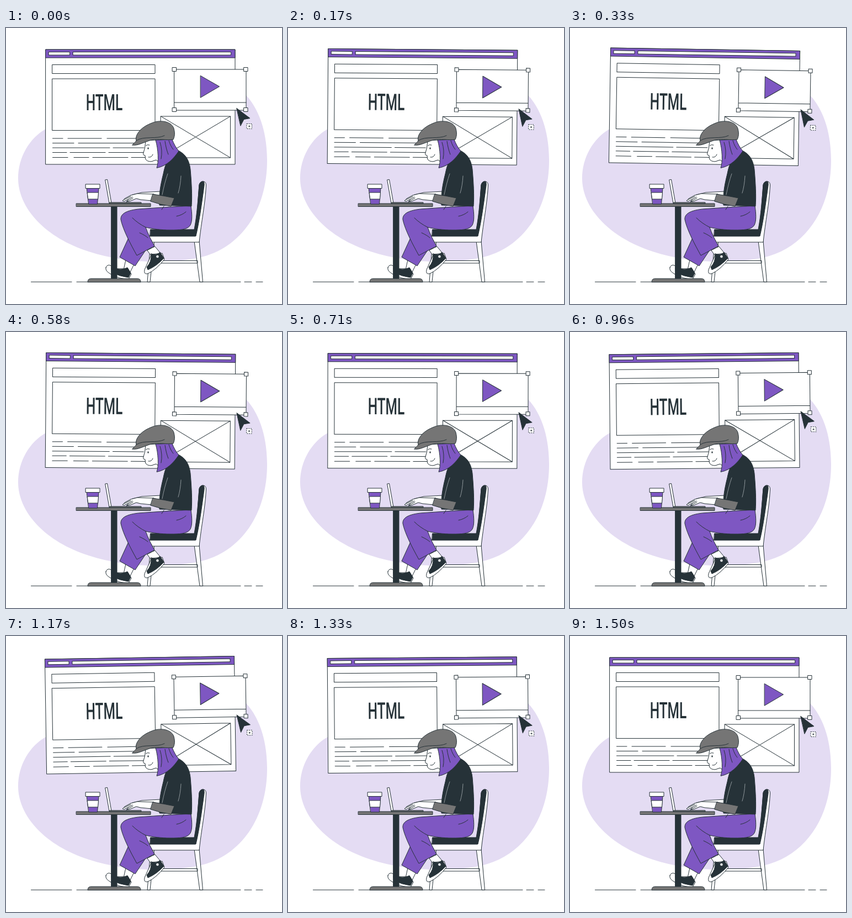
An HTML page that plays this animation: 500 px wide and 500 px high, repeating every 1.54 s.

```html
<!DOCTYPE html>
<html lang="en">
<head>
<meta charset="utf-8">
<title>Web designer at work</title>
<style>
  html, body { margin: 0; width: 100%; height: 100%; overflow: hidden; background: #fff; }
  svg { display: block; width: 100%; height: 100%; }
  .ink { stroke: #263238; stroke-width: 1; stroke-linecap: round; stroke-linejoin: round; }
  .w { fill: #fff; }
  .p { fill: #7e57c2; }
  .d { fill: #263238; }
  .g { fill: #757575; }
  .n { fill: none; }
  .title { font: 500 41.5px Roboto, "Open Sans", sans-serif; fill: #263238; stroke: none; text-anchor: middle; }
</style>
</head>
<body>
<svg viewBox="0 0 500 500">
  <path fill="#e4dcf3" d="M72 183C43 199 22 234 22 272C22 327 72 380 150 405C215 426 290 428 350 416C427 399 473 328 473 240C473 195 462 152 436 123L400 90L100 170Z"/>

  <g id="page" class="ink">
    <rect class="w" x="72" y="39" width="343" height="208"/>
    <rect class="p" x="72" y="39" width="343" height="15"/>
    <rect class="w" x="77.5" y="43.5" width="38" height="5.5"/>
    <rect class="w" x="121.5" y="43.5" width="286" height="5.5"/>
    <rect class="w" x="84" y="66.5" width="186" height="16"/>
    <rect class="w" x="84" y="92" width="186" height="93.5"/>
    <text class="title" transform="translate(178 149.3) scale(.59 1)">HTML</text>
    <path class="n" d="M84.500 200H103M112 200H173M183 200H236
      M84.500 208.500H123M131 208.500H236
      M84.500 217H188M194 217H250
      M84.500 225.500H110M116 225.500H180M186 225.500H250
      M84.500 234.500H112M123 234.500H150M157 234.500H221M227 234.500H260"/>
    <path class="w" d="M280.500 160H406.500V235H280.500ZL406.500 235M406.500 160L280.500 235"/>
    <path class="w" d="M305 75H435V149H305ZM305 135H435"/>
    <path class="p" d="M352.500 86.500L386.500 106L352.500 126Z"/>
    <path class="w" d="M301.500 71.500h7v7h-7zM431 71.500h7v7h-7zM301.500 144.500h7v7h-7zM431 144.500h7v7h-7z"/>
    <path class="d" d="M418 145.500L442 163.500L431 165.500L425 177Z"/>
    <rect class="w" x="436" y="173.500" width="9.500" height="9" stroke-dasharray="2 1.6" stroke-linecap="butt"/>
    <path class="n" d="M439.500 178h2.500M440.750 176.800v2.500"/>
  </g>

  <g class="ink">
    <path class="n" d="M45.500 460H119M128 460H425M432 460H445M453 460H465"/>

    <!-- chair -->
    <path class="w" d="M262 388L256 460H261L268.500 388ZM264 421.500H347V426H264ZM341 386L351 460H356.500L349.500 380Z"/>
    <path class="w" d="M258 377H343L350 284Q352 277 358 278Q363 279 362.500 286C361 318 354 350 350 388H260Q257 384 258 377Z"/>
    <path class="d" d="M262 365H341C346 339 348 309 350 284Q352 277 358 278C360 281 359 286 358 293C354 322 350 352 344 377H261Z"/>

    <!-- far leg -->
    <path class="w" d="M217 420L213 438L225 442L233 426Z"/>
    <path class="w" d="M181 434Q183 428 189 430L196 436L221 436L227 446L222 455Q205 455 190 446Q179 440 181 434Z"/>
    <path class="d" d="M191 434L200 436Q210 439 220 434L226 444L222 452Q206 450 192 443Z"/>
    <path class="p" d="M223 378L206 415L234 431L264 386Z"/>

    <!-- near leg -->
    <path class="w" d="M256 403L264 414L280 408L270 396Z"/>
    <path class="w" d="M264 410L283 408L287 419Q272 438 257 445Q249 447 251 438Z"/>
    <path class="d" d="M263 409Q273 413 279 406L286 417Q272 432 257 438L255 433Q264 424 263 409Z"/>
    <circle class="w" cx="274.500" cy="414" r="2.800"/>
    <path class="p" d="M284 325L335 322C337 336 338 349 334 357C329 366 313 366 298 366C280 366 266 364 253 361C257 373 263 384 269 395L237 412C226 392 212 366 208 347C207 335 222 330 240 328Z"/>
    <path class="n" d="M253 361Q239 354 229 344M242 371Q253 376 257 380M286 323L282 329M326 333Q319 339 309 341"/>

    <!-- far arm -->
    <path class="w" d="M280 296L246 298L229 302L238 309L280 304Z"/>

    <!-- head -->
    <path class="w" d="M253 204L251.500 217L248.500 228Q249 231 252 231L252.500 237Q255 242 263 242L272 239L277 243L282 203Z"/>
    <ellipse class="d" cx="257.500" cy="218" rx="1.200" ry="1.800" stroke="none"/>
    <path class="n" d="M253.500 213Q256 210.500 260 212M258 234Q264 235 266 229"/>
    <path class="d" d="M312 222C325 228 332 239 334 256C336 280 337.500 304 336 323L278 321C277 300 280 284 285 264C288 249 291 241 298 235Z"/>
    <path class="p" d="M271 203L301 202C304 210 308 217 313 223C304 236 292 250 273 253.500C277 243 276 220 271 203Z"/>
    <path class="n" d="M279 207Q284 222 281 237M288 205Q290 219 294 229M295 204Q298 214 303 220"/>
    <path class="g" d="M229 212C231 208 235 207 236 204C233 194 244 180 262 173C279 165 300 169 304 182C306 189 306 196 303 202C291 204 277 200 263 203C249 207 238 214 229 212Z"/>
    <path class="n" d="M236 204C249 195 273 202 287 195"/>

    <!-- near arm -->
    <path class="w" d="M268 301L238 300L226 303L215 309L211 313L214 314L222 310L218 315L224 314L236 309L244 311L264 313Z"/>
    <path class="n" d="M222 310L229 306M218 315L230 308M214 311L226 305"/>
    <path class="g" d="M266 301Q286 304 305 308L299 323Q279 320 262 314Z"/>
    <path class="n" stroke="#8f979b" d="M293 264Q287 281 283 302M317 268Q316 286 312 299"/>

    <!-- table -->
    <path class="d" d="M191 323H201V455H191Z"/>
    <path class="g" d="M148 460Q148 454 154 454H238Q244 454 244 460ZM127.500 318H262V323.500H127.500Z"/>
    <path class="w" d="M180 275L183.500 274.500L191 317L187.500 318Z"/>
    <path class="g" d="M188 316H245V318H188Z"/>
    <path class="p" d="M146.500 290H168L165.500 319H150Z"/>
    <path class="w" d="M147.500 298H167.500L166.500 310H149ZM144.500 283H170V290.500H144.500Z"/>
  </g>
</svg>
<script>
  const LOOP = 1540, SWAY = 1500, FPS = 24;
  const page = document.getElementById("page");

  // Linear sway: 0 -> 1 -> -1 -> 0 degrees
  const sway = p => p < .25 ? p * 4 : p < .75 ? 2 - p * 4 : p * 4 - 4;

  function draw(now) {
    const t = Math.floor((now % LOOP) / 10) * 10;
    const step = Math.floor((t + 5) * FPS / 1000);
    const angle = sway(step * 1000 / FPS / SWAY);
    page.setAttribute("transform", `rotate(${angle} 259 143)`);
  }

  const start = performance.now();
  function tick(now) {
    draw(Math.max(0, now - start));
    requestAnimationFrame(tick);
  }
  draw(0);
  requestAnimationFrame(tick);
</script>
</body>
</html>
```
